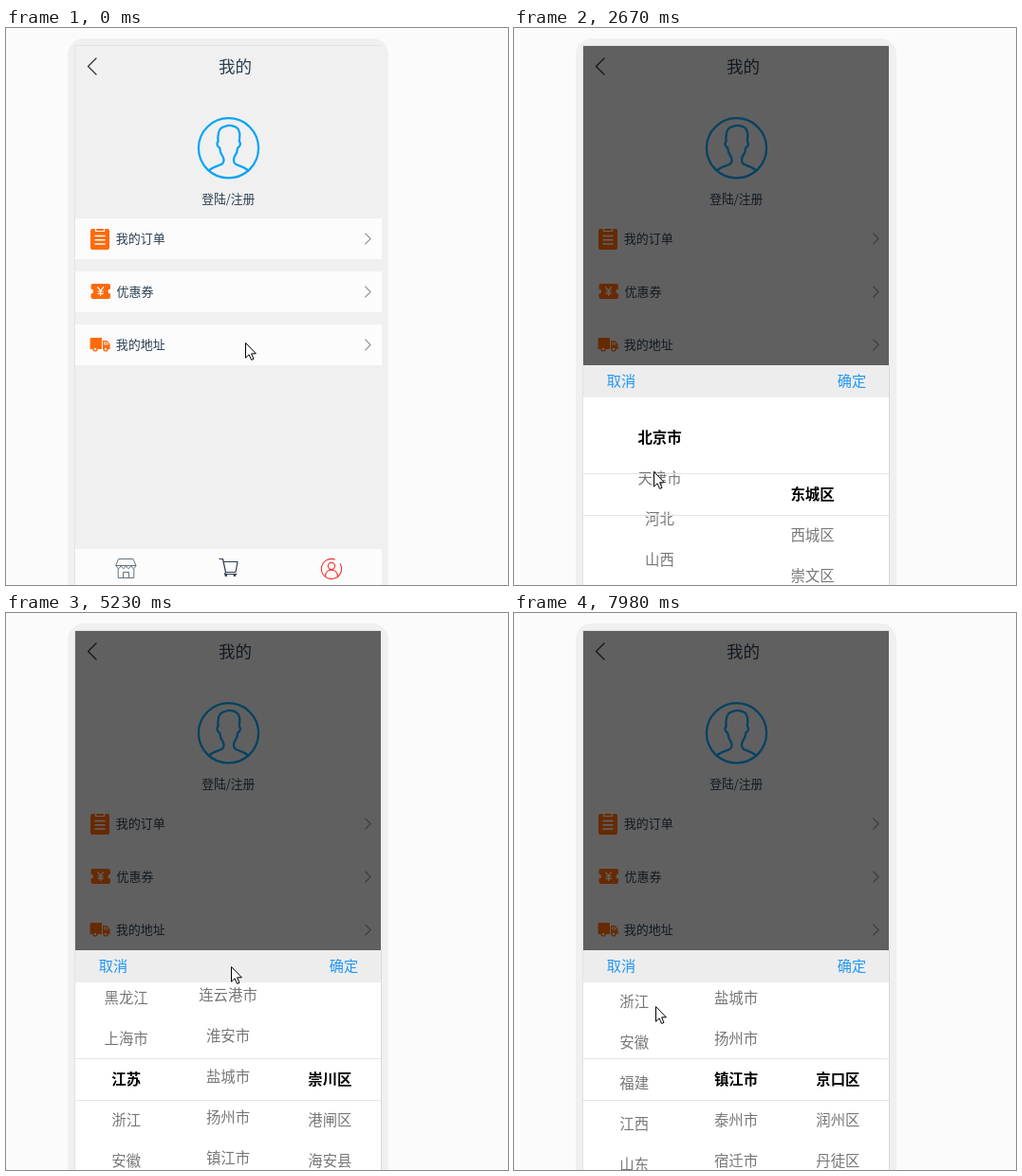
These frames come from a looping animation (529 px wide and 588 px high, 8 s). An HTML page:

```html
<!DOCTYPE html>
<html lang="zh-CN">
<head>
<meta charset="utf-8">
<title>我的</title>
<style>
html, body { margin: 0; width: 100%; height: 100%; overflow: hidden; background: #fbfbfb; }
svg { display: block; width: 529px; height: 588px; }
text { font-family: "Noto Sans CJK SC", "Noto Sans CJK", "Noto Sans", sans-serif; fill: #2c3e50; }
.page { font-weight: 300; }
.mid { text-anchor: middle; }
.line { fill: none; stroke-linecap: round; stroke-linejoin: round; }
.row { font-size: 15.4px; fill: #777; text-anchor: middle; }
.row.on { font-weight: 700; fill: #000; }
.btn { font-size: 15.2px; fill: #2196f3; }
</style>
</head>
<body>
<svg viewBox="0 0 529 588">
  <defs>
    <clipPath id="screen"><rect x="73" y="19" width="323" height="569"/></clipPath>
    <clipPath id="wheel"><rect x="73" y="390" width="323" height="260"/></clipPath>
    <path id="more" class="line" d="M378.7 217l5.5 5.5l-5.5 5.5" stroke="#999" stroke-width="1.1"/>
    <rect id="band" x="73" y="201" width="323" height="43" fill="#fcfcfc"/>
  </defs>
  <rect x="65" y="11" width="338" height="640" rx="17" fill="#f0f0f0"/>
  <path d="M72.5 588V18.5H396" fill="none" stroke="#e2e2e2"/>

  <g class="page" clip-path="url(#screen)">
    <path class="line" d="M95 32L86.5 40.5L95 49" stroke="#333" stroke-width="1.3"/>
    <text class="mid" x="241.5" y="47" font-size="17.5">我的</text>

    <g class="line" stroke="#0aa5f5" stroke-width="2.3">
      <circle cx="234.5" cy="126.8" r="31.6"/>
      <path d="M214 150.5C217 146.5 224 146 228 143.2C230 141.5 229.5 138 228.4 135.6C226 132.5 225.4 129 225.2 126.6C222.4 125 221.6 121.6 223.6 119.6C222.6 110 225.4 104.4 231 103.8C236 101.8 244.4 103.4 245.6 109C247 112 246 116 245.8 119.6C247.6 121.6 247 125 244.2 126.6C244 129.6 243 132.6 240.8 135.6C239.8 138.6 239.4 141.6 241.4 143.2C245.4 146 252 146.5 255 150.5"/>
    </g>
    <text class="mid" x="234.3" y="184.7" font-size="12.8">登陆/注册</text>

    <g id="bands"><use href="#band"/><use href="#band" y="56"/><use href="#band" y="112"/></g>
    <use href="#more"/><use href="#more" y="56"/><use href="#more" y="112"/>
    <g font-size="13">
      <text x="115.7" y="227.2">我的订单</text>
      <text x="116.5" y="283.2">优惠券</text>
      <text x="115.7" y="339.2">我的地址</text>
    </g>

    <g fill="#ff6a0a">
      <rect x="89" y="212" width="20" height="22" rx="2"/>
      <path d="M91.5 270H108Q110 270 110 272V275.5A2.5 2.5 0 0 0 110 280.5V284Q110 286 108 286H91.5Q89.5 286 89.5 284V280.5A2.5 2.5 0 0 0 89.5 275.5V272Q89.5 270 91.5 270z"/>
      <path d="M89.5 327H101V339H88.6V328zM102 330H106.5L109.6 334V339H102z"/>
      <circle cx="94" cy="339" r="2.6"/><circle cx="105" cy="339" r="2.6"/>
    </g>
    <g class="line" stroke="#fcfcfc" stroke-width="1.4">
      <path d="M94 219.5h10M94 223.7h10M94 228h10"/>
      <path d="M94.5 211.5v3h9v-3" stroke-width="1.2"/>
      <path d="M96.6 273.6l3 3.8l3-3.8M99.6 277.4v5M97 278h5.2M97 280.3h5.2" stroke-width="1.2"/>
      <path d="M104 331.8h2l1.6 2.2h-3.6z" stroke-width=".8"/>
    </g>
    <g fill="#fcfcfc"><circle cx="94" cy="339" r="1.2"/><circle cx="105" cy="339" r="1.2"/></g>

    <rect x="73" y="550" width="323" height="38" fill="#fcfcfc"/>
    <g class="line" stroke="#65727f">
      <path d="M119 560.5H134L137 567.5H116zM118.2 571V580.5H134.8V571M123.5 580.5V574.5H129.5V580.5"/>
      <path d="M116 567.5q2.6 6 5.2 0q2.6 6 5.3 0q2.6 6 5.2 0q2.6 6 5.3 0"/>
    </g>
    <path class="line" d="M225 560.5H228.5L231.5 574.5H242L244 563.5H229.5M231.5 574.5L230.5 576.5H243" stroke="#2c3e50" stroke-width="1.2"/>
    <circle cx="231.8" cy="577.8" r="1.4" fill="#2c3e50"/><circle cx="241" cy="577.8" r="1.4" fill="#2c3e50"/>
    <g class="line" stroke="#f5302f" stroke-width="1.1">
      <path d="M346.5 561A10.6 10.6 0 1 0 352.2 565.8"/>
      <circle cx="343" cy="568" r="3.6"/>
      <path d="M336.6 578.5C336.8 570 349.2 570 349.4 578.5"/>
    </g>

    <rect id="mask" x="73" y="19" width="322" height="569"/>

    <g id="sheet" font-weight="400">
      <rect x="73" y="356" width="323" height="290" fill="#fff"/>
      <rect x="73" y="356" width="323" height="34" fill="#ededed"/>
      <text class="btn" x="97.7" y="378.4">取消</text>
      <text class="btn" x="340.7" y="378.4">确定</text>
      <g id="rows" clip-path="url(#wheel)"></g>
      <path d="M73 470.5h323M73 514.5h323" stroke="#e4e4e4"/>
      <path d="M395.5 356v290" stroke="#d8d8d8"/>
    </g>
  </g>

  <path id="cursor" d="M.5 .5V16.2L4.1 12.8L6.6 18.4L9 17.4L6.6 11.8H11.4z" fill="#fff" stroke="#000" stroke-linejoin="round"/>
</svg>

<script>
const LOOP = 8000, PITCH = 43, CENTER = 492, SETTLE = 160, OPEN = 1440;
const $ = id => document.getElementById(id);
const list = s => s.split(' ');

const provinces = list('北京市 天津市 河北 山西 内蒙古 辽宁 吉林 黑龙江 上海市 江苏 浙江 安徽 福建 江西 山东 河南 湖北');
const jiangsu = list('南京市 无锡市 徐州市 常州市 苏州市 南通市 连云港市 淮安市 盐城市 扬州市 镇江市 泰州市 宿迁市');

// Plain pointer moves have no column; drags pick an index and may refill the columns to the right
const moves = [
  { t: 370, ms: 90, from: [252, 332], to: [243, 342] },
  { t: 1020, ms: 80, from: [243, 342], to: [214, 340] },
  { t: 1940, ms: 420, from: [214, 340], to: [148, 528] },
  { t: 2510, ms: 270, from: [148, 528], to: [146, 428], col: 0, pick: 3,
    lists: [list('太原市 大同市 阳泉市'), list('小店区 迎泽区 杏花岭区')] },
  { t: 3150, ms: 280, from: [146, 523], to: [142, 403], col: 0, pick: 6,
    lists: [list('长春市 吉林市 四平市'), list('南关区 宽城区 朝阳区')] },
  { t: 3820, ms: 270, from: [142, 530], to: [142, 436], col: 0, pick: 9,
    lists: [jiangsu, list('玄武区 白下区 秦淮区')] },
  { t: 4450, ms: 270, from: [236, 500], to: [237, 344], col: 1, pick: 5,
    lists: [jiangsu, list('崇川区 港闸区 海安县')] },
  { t: 4980, ms: 390, from: [237, 504], to: [237, 300], col: 1, pick: 11,
    lists: [jiangsu, list('海陵区 高港区 兴化市 靖江市 泰兴市 姜堰市')] },
  { t: 5780, ms: 250, from: [345, 500], to: [325, 273], col: 2, pick: 5 },
  { t: 6380, ms: 240, from: [220, 477], to: [220, 525], col: 1, pick: 10,
    lists: [jiangsu, list('京口区 润州区 丹徒区')] },
  { t: 7440, ms: 560, from: [170, 540], to: [148, 411], col: 0, pick: 13 }
];

const clamp = p => Math.min(1, Math.max(0, p));
const smooth = p => p * p * (3 - 2 * p);
const easeOut = p => 1 - (1 - p) ** 2;
const mix = (a, b, p) => a + (b - a) * p;
const mixPoint = (a, b, p) => a.map((v, i) => mix(v, b[i], p));

// After a move the pointer glides to the next start during the first half of the pause
function pointer(t) {
  const i = moves.findLastIndex(m => m.t <= t);
  if (i < 0) return moves[0].from;
  const m = moves[i], next = moves[i + 1], end = m.t + m.ms;
  if (t < end || !next) return mixPoint(m.from, m.to, clamp((t - m.t) / m.ms));
  return mixPoint(m.to, next.from, smooth(clamp((t - end) / (next.t - end) * 2)));
}

function wheelState(t) {
  const on = [0, 0, 0], pos = [0, 0, 0];
  let lists = [list('东城区 西城区 崇文区')];
  for (const m of moves) {
    if (m.col === undefined || t < m.t) continue;
    const p = clamp((t - m.t) / m.ms);
    const dragged = on[m.col] * PITCH + (m.from[1] - m.to[1]) * p;
    pos[m.col] = dragged;
    if (p < 1) continue;
    on[m.col] = m.pick;
    on.fill(0, m.col + 1);
    pos.fill(0, m.col + 1);
    pos[m.col] = mix(dragged, m.pick * PITCH, easeOut(clamp((t - m.t - m.ms) / SETTLE)));
    lists = m.lists || lists;
  }
  return { on, pos, cols: [provinces, ...lists] };
}

const SVG = 'http://www.w3.org/2000/svg';
const pool = [0, 1, 2].map(() => Array.from({ length: 7 }, () =>
  $('rows').appendChild(document.createElementNS(SVG, 'text'))));

function drawWheel(t) {
  const { on, pos, cols } = wheelState(t);
  const width = 322 / cols.length;
  pool.forEach((cells, c) => {
    const first = Math.floor(pos[c] / PITCH) - 3;
    cells.forEach((cell, k) => {
      const i = first + k;
      cell.textContent = cols[c]?.[i] || '';
      cell.setAttribute('class', i === on[c] ? 'row on' : 'row');
      cell.setAttribute('x', 73 + width * (c + .5));
      cell.setAttribute('y', CENTER + i * PITCH - pos[c] + 5.6);
    });
  });
}

const place = (id, x, y) => $(id).setAttribute('transform', `translate(${Math.round(x)} ${Math.round(y)})`);

function draw(t) {
  const rise = clamp((t - OPEN) / 280), shade = easeOut(clamp((t - OPEN) / 160));
  place('sheet', 0, 256 * (1 - rise) ** 2.6);
  $('sheet').style.display = rise ? '' : 'none';
  $('mask').setAttribute('opacity', .6 * shade);
  $('bands').setAttribute('opacity', 1 - shade);
  if (rise) drawWheel(t);
  place('cursor', ...pointer(t));
}

const start = performance.now();
function tick() {
  draw((performance.now() - start) % LOOP);
  requestAnimationFrame(tick);
}
tick();
</script>
</body>
</html>
```
